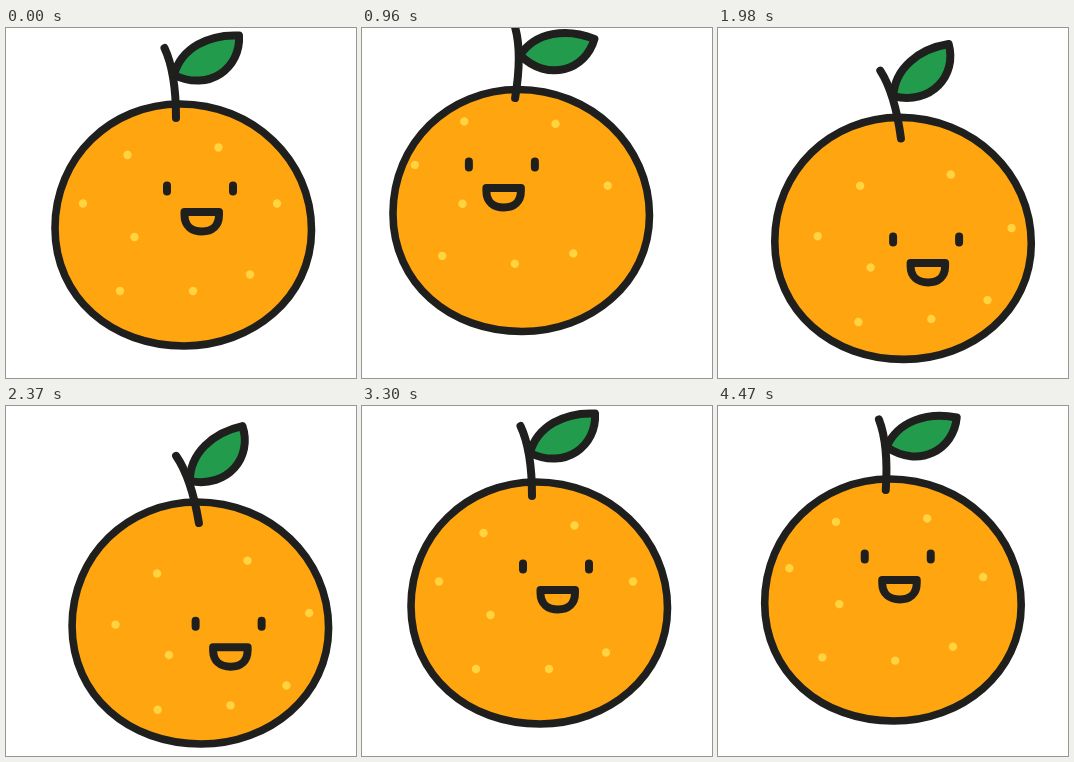
An HTML page that plays this animation: 350x350 px, repeating every 4.5 s.

```html
<!DOCTYPE html>
<html lang="en">
<head>
<meta charset="utf-8">
<title>Orange</title>
<style>
  html, body { margin: 0; width: 100%; height: 100%; overflow: hidden; background: #fff; }
  svg { display: block; width: 100%; height: 100%; }
  .line { stroke: #1f201e; stroke-width: 8; stroke-linecap: round; stroke-linejoin: round; fill: none; }
  #body { fill: #ffa510; stroke-width: 7.6; }
  #leaf { fill: #239b4d; }
  #dots { stroke: #ffd440; stroke-width: 8.4; stroke-linecap: round; fill: none; }
</style>
</head>
<body>
<svg viewBox="0 0 350 350">
  <path id="body" class="line"
    d="M49 200C49 129 105 76 174 76C247 76 305.5 132 305.5 202C305.5 270 246 318 178 318C106 318 49 270 49 200Z"/>
  <path id="dots" d="M121.5 127h0M212.5 119.5h0M77 175.5h0M271 175.5h0M128.5 209h0M114 263h0M187 263h0M244 246.5h0"/>
  <g id="face" class="line">
    <path d="M161 157.5v6M227 157.5v6"/>
    <path d="M178.5 184H213V187C213 198 206 203.5 196 203.5S178.5 198 178.5 187Z"/>
  </g>
  <g id="stem" class="line">
    <path id="leaf" d="M168 47C175 20 203 6 233 7.5C235 40 203 64 168 47Z"/>
    <path d="M158.5 20C166 36 170 56 170 90"/>
  </g>
</svg>
<script>
const LOOP = 4500, CYCLE = 4050, STEP = 30;

function ease(t, from, to) {
  const u = Math.min(1, Math.max(0, (t - from) / (to - from)));
  return u * u * (3 - 2 * u);
}

// Rest, lean left, lean right, rest. A larger bend makes a part trail behind.
function swing(t, left, right, bend) {
  const lean = ease(t, 0, 1140) ** bend;
  const cross = ease(t, 1330, 2200) ** bend;
  const back = ease(t, 2200, 3200);
  return (left * lean * (1 - cross) + right * cross) * (1 - back);
}

function place(id, x, y, turn = 0, px = 0, py = 0) {
  document.getElementById(id)
    .setAttribute("transform", `translate(${x} ${y}) rotate(${turn} ${px} ${py})`);
}

function draw(ms) {
  // The loop cuts off partway into a second cycle.
  const t = Math.floor(ms % LOOP / STEP) * STEP % CYCLE;
  const go = (left, right, bend) => swing(t, left, right, bend);
  const stemTurn = go(9.8, -10.2, 0.8);
  const leafTurn = go(20, -16.3, 0.73);

  place("body", go(-20.5, 18.5, 1.85), go(-16, 21.7, 1.43));
  place("dots", go(-29.5, 36.4, 1.25), go(-30.1, 40.2, 1.05), go(6.5, -3.7, 0.78), 177, 197);
  place("face", go(-58.8, 31, 1.2), go(-25.3, 62, 0.78));
  place("stem", go(-19.3, 25, 1.8), go(-21.6, 29.3, 1.1), stemTurn, 170, 91);
  place("leaf", 0, 0, leafTurn - stemTurn, 169, 47);
}

const start = performance.now();
function tick() {
  draw(performance.now() - start);
  requestAnimationFrame(tick);
}
tick();
</script>
</body>
</html>
```
